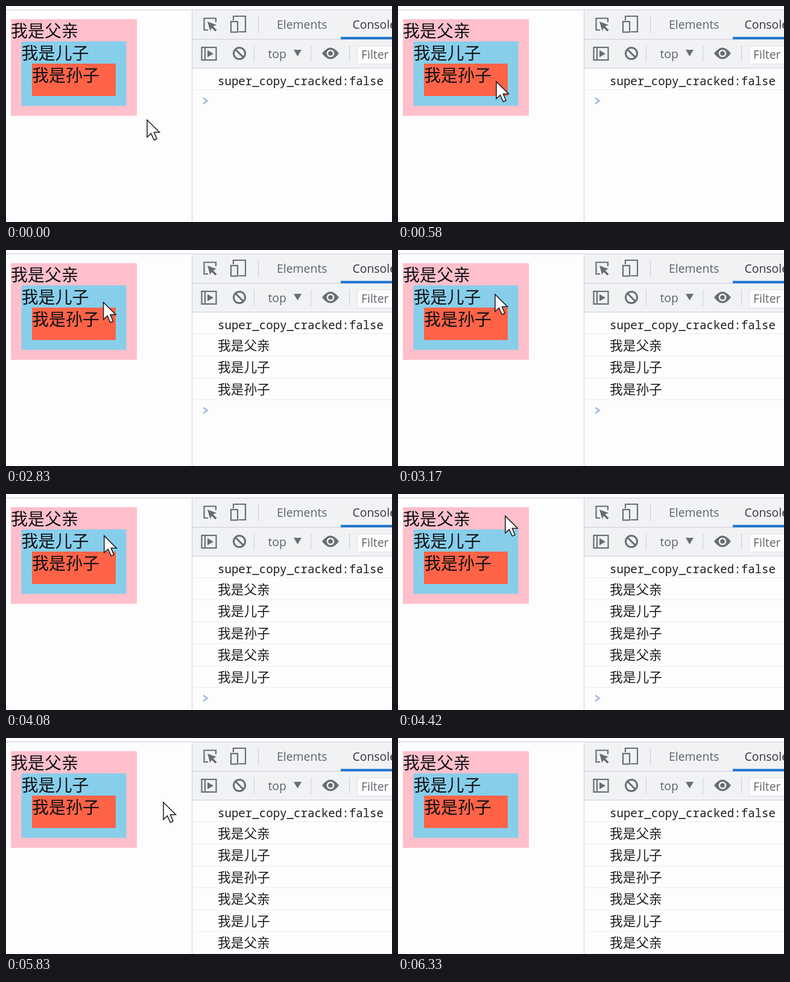
Recreate the animation shown at these times as an HTML page. Size 640 px wide and 360 px high, loop 6990 ms.

```html
<!DOCTYPE html>
<html lang="zh-CN">
<head>
<meta charset="utf-8">
<title>Event order</title>
<style>
  html, body { margin: 0; width: 100%; height: 100%; overflow: hidden; background: #fdfdfd; }
  svg { display: block; width: 100vw; height: 100vh; }
  .cjk { font-family: "Noto Sans CJK SC", "Noto Sans CJK", sans-serif; fill: #1c1c1e; }
  .page { font-size: 28px; fill: #101014; }
  .log { font-size: 21.7px; }
  .ui { font: 19.4px "Open Sans", "Noto Sans", sans-serif; fill: #5f6368; }
  .ui .active { fill: #333438; }
  .mono { font: 19.1px "Noto Sans Mono", monospace; fill: #1c1c1e; }
  .icon { fill: none; stroke: #6a6d71; stroke-width: 2.2; }
  .solid { fill: #6a6d71; }
  .rule { stroke: #cbcddb; fill: none; }
  .row { stroke: #ededf7; }
</style>
</head>
<body>
<svg viewBox="0 0 640 360">
  <rect width="640" height="360" fill="#fdfdfd"/>
  <g id="boxes" class="cjk page"></g>

  <rect x="309" y="7" width="331" height="97" fill="#f1f2f4"/>
  <path class="rule" d="M0 6.5H640M308.5 6V360M309 55.5H640M309 103.5H640M418.5 17V45M411.5 66V93M505.5 66V93M569.5 66V93"/>
  <rect x="555" y="51.5" width="85" height="4" fill="#1a73d0"/>
  <rect x="582.5" y="66.5" width="70" height="30" fill="#fdfdfd" stroke="#dfe0e8"/>

  <g class="icon">
    <path d="M335 40H328.5V20.5H348V27"/>
    <path d="M377 24V17H397V43H386"/>
    <rect x="373" y="26" width="11" height="17.5"/>
    <rect x="324.5" y="69" width="24" height="21"/>
    <path d="M330 69V90"/>
    <circle cx="387" cy="79" r="9.5" stroke-width="3"/>
    <path d="M380.5 72.5L393.5 85.5" stroke-width="3"/>
  </g>
  <g class="solid">
    <path d="M334 26L349 31.5L343.5 34L349.5 40L347 42.5L341 36.5L338.5 41.5Z"/>
    <path d="M334 73.5L344 79.5L334 85.5Z"/>
    <path d="M477 73H490L483.5 84Z"/>
    <path d="M524 79Q538 60 552 79Q538 98 524 79Z"/>
    <circle cx="538" cy="79" r="6.3" fill="#f1f2f4"/>
    <circle cx="538" cy="79" r="3.8"/>
  </g>
  <g class="ui">
    <text x="449" y="38">Elements</text>
    <text class="active" x="574.5" y="38">Console</text>
    <text x="434.5" y="86.5">top</text>
    <text x="589" y="87.5">Filter</text>
  </g>

  <text class="mono" x="351" y="131.5">super_copy_cracked:false</text>
  <path class="row" d="M309 139.5H640"/>
  <g id="logs" class="cjk log"></g>
  <path id="prompt" d="M327 -5L333.5 0L327 5" fill="none" stroke="#8fabdc" stroke-width="2.2"/>
  <path id="cursor" d="M0 0V28.5L6.5 22.5L11.5 33.5L16 31.5L11.5 20.5H20.5Z" fill="#fdfdfd" stroke="#18181a" stroke-width="1.5"/>
</svg>
<script>
const LOOP = 6990, FPS = 12, ROW = 36.5, FIRST = 158;
const SVG = "http://www.w3.org/2000/svg";
const byId = id => document.getElementById(id);

const boxes = [
  { name: "我是父亲", color: "#ffc0cb" },
  { name: "我是儿子", color: "#87ceeb" },
  { name: "我是孙子", color: "#ff6347" }
];

// Each click logs from the outermost box inwards; times are in ticks.
const clicks = [{ at: 23, depth: 3 }, { at: 42, depth: 2 }, { at: 58, depth: 1 }];

const HOME = { x: 234, y: 190 }, GONE = 76;
const moves = [
  { at: 1, steps: 2, x: 210, y: 145 },
  { at: 4, steps: 4, x: 163, y: 126 },
  { at: 31, steps: 2, x: 162, y: 100 },
  { at: 34, steps: 5, x: 161, y: 74 },
  { at: 49, steps: 2, x: 163, y: 69 },
  { at: 52, steps: 4, x: 180, y: 32 },
  { at: 67, steps: 2, x: 187, y: 48 },
  { at: 70, steps: 5, x: 557, y: 344, power: 1 }
];

function add(parent, tag, attrs) {
  const el = document.createElementNS(SVG, tag);
  for (const key in attrs) el.setAttribute(key, attrs[key]);
  return parent.appendChild(el);
}

// Nested boxes: each one is inset by its padding and one line of text.
boxes.forEach(({ name, color }, i) => {
  const x = 8 + 17.5 * i, y = 22 + 37 * i;
  add(byId("boxes"), "rect", { x, y, width: 209 - 35 * i, height: 161 - 53.5 * i, fill: color });
  add(byId("boxes"), "text", { x, y: y + 29.5 }).textContent = name;
});

const logs = [];
for (const { at, depth } of clicks) {
  for (const { name } of boxes.slice(0, depth)) {
    const y = FIRST + logs.length * ROW;
    const line = Math.floor(y + 18.5) + 0.5;
    const el = add(byId("logs"), "g", {});
    add(el, "text", { x: 351, y: y + 8.5 }).textContent = name;
    add(el, "path", { class: "row", d: `M309 ${line}H640` });
    logs.push({ at, el });
  }
}

function pointerAt(tick) {
  let { x, y } = HOME;
  for (const { at, steps, power = 3, ...to } of moves) {
    if (tick < at) break;
    const p = Math.min(1, (tick - at + 1) / steps);
    const k = 1 - (1 - p) ** power;
    x += (to.x - x) * k;
    y += (to.y - y) * k;
  }
  return { x, y };
}

function render(ms) {
  // The small lead absorbs the rounding of ticks to 10 ms.
  const tick = Math.floor((ms + 4) * FPS / 1000);
  let count = 0;
  for (const { at, el } of logs) {
    const shown = tick >= at;
    el.style.display = shown ? "" : "none";
    count += shown;
  }
  byId("prompt").setAttribute("transform", `translate(0 ${FIRST + count * ROW})`);

  const { x, y } = pointerAt(tick);
  const cursor = byId("cursor");
  cursor.setAttribute("transform", `translate(${x} ${y})`);
  cursor.style.display = tick < GONE ? "" : "none";
}

const start = performance.now();
function frame() {
  render((performance.now() - start) % LOOP);
  requestAnimationFrame(frame);
}
frame();
</script>
</body>
</html>
```
